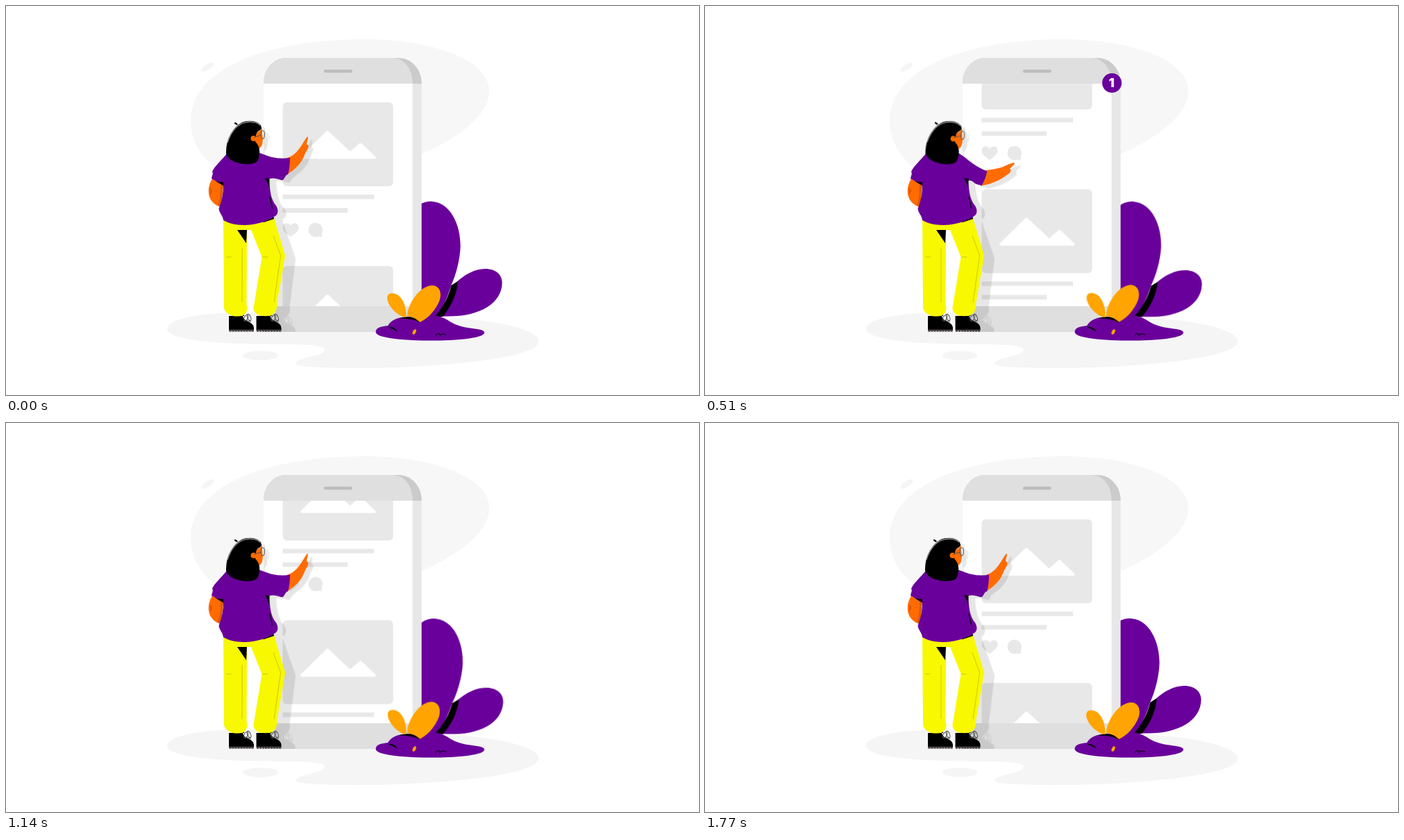
Recreate the animation shown at these times as an HTML page. Size 998 by 561 pixels, loop 1800 ms.

```html
<!DOCTYPE html>
<html lang="en">
<head>
<meta charset="utf-8">
<title>Scrolling a feed</title>
<style>
html, body { margin: 0; width: 100%; height: 100%; overflow: hidden; background: #fff; }
svg { display: block; width: 998px; height: 561px; }

.feed, .sleeve, .forearm, .head, .sway, .badge { animation: 1.8s linear infinite; }
.sleeve, .forearm, .head { animation-timing-function: cubic-bezier(.333, 0, .667, 1); }
.feed { animation-name: scroll; }
.sleeve { animation-name: sleeve; }
.forearm { animation-name: forearm; }
.head { animation-name: nod; transform-origin: 345px 225px; }
.badge { animation-name: pop; transform-origin: 586px 111px; }
.sway { animation-name: sway; animation-timing-function: cubic-bezier(.364, 0, .636, 1); }
.big { transform-origin: 605px 450px; --lean: 2.2deg; }
.right { transform-origin: 582px 452px; --lean: -2deg; }
.left { transform-origin: 576px 450px; --lean: 1.8deg; }
.shade .person { filter: brightness(0); }

@keyframes scroll {
  0%, 5.83% { transform: translateY(0); animation-timing-function: cubic-bezier(.333, 0, .667, 0); }
  21.67% { transform: translateY(57px); animation-timing-function: cubic-bezier(.333, .667, .667, 1); }
  100% { transform: translateY(472px); }
}
@keyframes sleeve {
  0%, 5.56%, 53.3%, 100% { d: path("M360 210C374 214 382 222 409 219C409 228 408 236 406 243C402 243 401 251 398 251C394 251 388 247 379 249L365 262Z"); }
  31.67% { d: path("M360 210C376 216 380 228 406 239C405 246 402 253 398 260C395 258 392 258 390 257C386 254 384 251 379 252L365 262Z"); }
}
@keyframes forearm {
  0%, 5.56%, 53.3%, 100% { d: path("M405 219C416 216 422 206 425 202C428 197 431 192 434 188L435 190C434 194 433 197 433 200C437 199 435 205 434 207C430 213 428 221 424 226C418 234 412 238 405 243Z"); }
  31.67% { d: path("M403 238C412 237 420 236 428 234C434 231 440 229 446 227.5L446 230C443 233 441 235 439 236C442 238 440 241 438 243C432 247 425 252 419 254C410 258 404 259 397 260Z"); }
}
@keyframes nod {
  0%, 5.56%, 53.3%, 100% { transform: rotate(0deg); }
  31.67% { transform: rotate(2deg); }
}
@keyframes sway {
  0%, 100% { transform: rotate(0deg); }
  50% { transform: rotate(var(--lean)); }
}
@keyframes pop {
  0%, 12% { transform: scale(0); animation-timing-function: ease-out; }
  16.5% { transform: scale(1.28); animation-timing-function: ease-in-out; }
  21.67% { transform: scale(.94); animation-timing-function: ease-in-out; }
  28.33% { transform: scale(1); animation-timing-function: ease-in-out; }
  32.5% { transform: scale(1.14); animation-timing-function: ease-in; }
  38.5%, 100% { transform: scale(0); }
}
</style>
</head>
<body>
<svg viewBox="0 0 998 561">
  <defs>
    <clipPath id="screen"><rect x="371" y="112" width="215" height="321"/></clipPath>
    <clipPath id="phone"><path d="M371 112C371 91 385 75 404 75H565C584 75 598.500 91 598.500 112V470H371Z"/></clipPath>

    <g id="post" fill="#e8e8e8">
      <rect x="398.500" y="139" width="159" height="121" rx="6"/>
      <path d="M426 218.500L463 182L495.500 212.500L510.500 199.500L530.500 218.500Z" fill="#fff" stroke="#fff" stroke-width="4" stroke-linejoin="round"/>
      <path d="M398.500 272h131.500v6.500h-131.500zM398.500 291.500h93.500v6.500h-93.500z"/>
      <path d="M410 333C404 328 398.500 325 398.500 319.500C398.500 312 407 311.500 410 317C413 311.500 421.500 312 421.500 319.500C421.500 325 416 328 410 333Z"/>
      <path d="M454.500 333L449 332.500A10.200 10.200 0 1 1 455 327Z"/>
    </g>

    <g id="boot">
      <path d="M334 441L343 444V447H336Z"/>
      <path d="M335 444.500L341 446V448H335Z" fill="#f8f800"/>
      <path d="M321 447H341C342 456 356 454 357 464V467H321Z"/>
      <path d="M321 466.500H357V468.500H321Z" fill="#413b3b"/>
      <path d="M321.500 469H357" stroke="#413b3b" stroke-width="1.600" stroke-dasharray="3 1"/>
      <g fill="none" stroke="#444" stroke-width=".9">
        <ellipse cx="345.500" cy="450" rx="2.500" ry="5" transform="rotate(28 345.500 450)"/>
        <ellipse cx="350" cy="449" rx="2.300" ry="5" transform="rotate(-24 350 449)"/>
        <path d="M342 453L353 455"/>
      </g>
    </g>
  </defs>

  <path d="M266 165C267 84 390 48 516 48C615 48 696 78 696 122C696 163 640 195 598 214C540 240 470 262 390 262C330 262 265 225 266 165Z" fill="#f7f7f7"/>
  <ellipse cx="290.500" cy="88" rx="10.500" ry="4" transform="rotate(-33 290.500 88)" fill="#f5f5f5"/>
  <path d="M232 465C233 450 285 442 345 442C450 441 560 447 640 450C705 453 767 466 767 484C767 511 590 524 480 522C438 521 415 520 417 515C422 506 460 505 459 495C456 486 400 489 340 487C280 485 232 479 232 465Z" fill="#f5f5f5"/>
  <ellipse cx="367" cy="504" rx="25.500" ry="6.700" fill="#f5f5f5"/>

  <g class="sway big">
    <path d="M620 449C630 435 645 405 650 397C660 388 675 379 690 379C706 379 714.500 388 714.500 399C714 430 680 449 632 447.500Z" fill="#6a009b"/>
    <path d="M641 403L650.500 397C650 415 640 435 629 448L614 448C630 435 638 418 641 403Z"/>
    <path d="M585 455V296C595 284 606 281 614 282C640 284 654.500 315 654.500 346C654 365 648 388 641 403C636 420 630 435 617 448Z" fill="#6a009b"/>
  </g>

  <g clip-path="url(#phone)">
    <path d="M371 75H599V470H371Z" fill="#e7e7e7"/>
    <path d="M371 75H599V112H371Z" fill="#cbcbcb"/>
    <path d="M371 75H556C574 75 585.500 91 585.500 112H371Z" fill="#dfdfdf"/>
    <path d="M371 112H585.500V433H371Z" fill="#fff"/>
    <path d="M371 433H599V470H371Z" fill="#dfdfdf"/>
  </g>
  <path d="M460 94H496.500" stroke="#bdbdbd" stroke-width="4.500" stroke-linecap="round"/>

  <g clip-path="url(#screen)">
    <g class="feed">
      <use href="#post" y="236"/>
      <use href="#post"/>
      <use href="#post" y="-236"/>
      <use href="#post" y="-472"/>
    </g>
  </g>

  <g clip-path="url(#phone)" opacity=".1">
    <g class="shade" transform="matrix(1 0 .05 1 -3 4)"></g>
  </g>

  <g class="person">
    <path d="M298 248C288.500 261 288 283 309 290L313 257Z" fill="#ff6b00"/>
    <path d="M309 257L313 258L310 290L305 287C309 278 309 268 309 257Z" fill="#d95a00"/>
    <path d="M294 262C298 263 298 269 294 272Z" fill="#d95a00"/>
    <use href="#boot"/>
    <use href="#boot" x="39.500"/>
    <path d="M313 306H386L402 360L390 430C391 438 387 444 382 446C376 448 368 447 364 446C358 443 355 438 357 432L368.500 362L353 323H347L346.500 431C349 438 346 443 342 446C336 448 328 448 324 446C317 443 313 438 314 432Z" fill="#f8f800"/>
    <path d="M333 323H347L346 342Z"/>
    <path d="M340 349V427M317 362H325M369 362H377M385 331L395.500 360L386 427" fill="none" stroke="#c8c500" stroke-width=".9"/>
    <path d="M368 309L385 302L386 307L371 312Z"/>
    <path class="forearm" fill="#ff6b00"/>
    <path d="M318 213C311 222 300 231 297 239C299 242 296 246 296 249C301 251 307 257 313 258C313 272 310 284 306.500 292C307 299 312 301 313 309C330 319 362 319 386 304C392 301 393 295 389 288C381 279 380 265 379 249L367 213Z" fill="#6a009b"/>
    <path class="sleeve" fill="#6a009b"/>
    <path d="M373 248L379.500 249L379 263C378 258 376 253 373 248Z"/>
    <path d="M380 275L383.500 292" stroke="#000" stroke-width="1.200"/>
    <path d="M303 253L313 254V259Z"/>
    <g class="head">
      <path d="M358 184C364 183 368 176 369 177C368 181 371 188 370 192C369 199 370 203 362 207L356 196Z" fill="#ff6b00"/>
      <path d="M317 213C317 196 324 177 340 168C350 164 364 166 368 175C369 180 361 179 360 186C360 191 357 195 361 198C365 203 367 211 363 222C360 229 345 229 337 227C327 225 319 220 317 213Z"/>
      <path d="M318 206C318 193 327 175 340 168.500C350 164.500 362 166 367 173" fill="none" stroke="#222" stroke-width="1.300"/>
      <path d="M319 197C324 182 331 173 341 169C350 165.500 361 167 366 172" fill="none" stroke="#999" stroke-width="1.200"/>
      <path d="M330 169L332.500 170.500" stroke="#000" stroke-width="2.200" stroke-linecap="round"/>
      <circle cx="356.500" cy="191" r="4" fill="#ff6b00"/>
      <g fill="none" stroke="#555" stroke-width="1.100">
        <path d="M357 189.500L368 186"/>
        <ellipse cx="369.800" cy="185.500" rx="2.500" ry="5.800" fill="#fff" fill-opacity=".35"/>
      </g>
    </g>
  </g>

  <g class="badge">
    <circle cx="586" cy="111" r="14" fill="#6a009b"/>
    <text x="585.500" y="117.500" text-anchor="middle" font-family="Inter, Roboto, sans-serif" font-weight="900" font-size="18" fill="#fff">1</text>
  </g>

  <path d="M532.500 470C533 462 545 462 550 461C555 451 570 446 590 449C600 455 612 445 622 447C640 452 640 460 665 464C680 466 689 467 689 471C689 480 640 482.500 615 482.500C575 482.500 532 479 532.500 470Z" fill="#6a009b"/>
  <path d="M566 451C577 446 590 448 597 457C588 452 577 450 566 451Z"/>
  <path d="M550 463C556 462 562 465 564 470C560 467 555 465 550 463Z"/>
  <path class="sway left" d="M576 449C564 448 549 432 549 421C549 412 560 413 566 418C574 426 577 438 576 449Z" fill="#ffa400"/>
  <path class="sway right" d="M577.500 447C580 425 598 403 614 403C628 404 628 420 622 430C615 443 605 452 596 456C590 450 584 448 577.500 447Z" fill="#ffa400"/>
  <ellipse cx="588" cy="470" rx="2.200" ry="4" transform="rotate(25 588 470)" fill="#ffa400"/>
  <path d="M619 475C622 471 625 472 625 475C628 472 630 473 634 474" fill="none" stroke="#1c0030" stroke-width="1.400"/>
</svg>
<script>
// The cast shadow is a skewed, blackened copy of the person.
const person = document.querySelector('.person');
document.querySelector('.shade').append(person.cloneNode(true));
</script>
</body>
</html>
```
